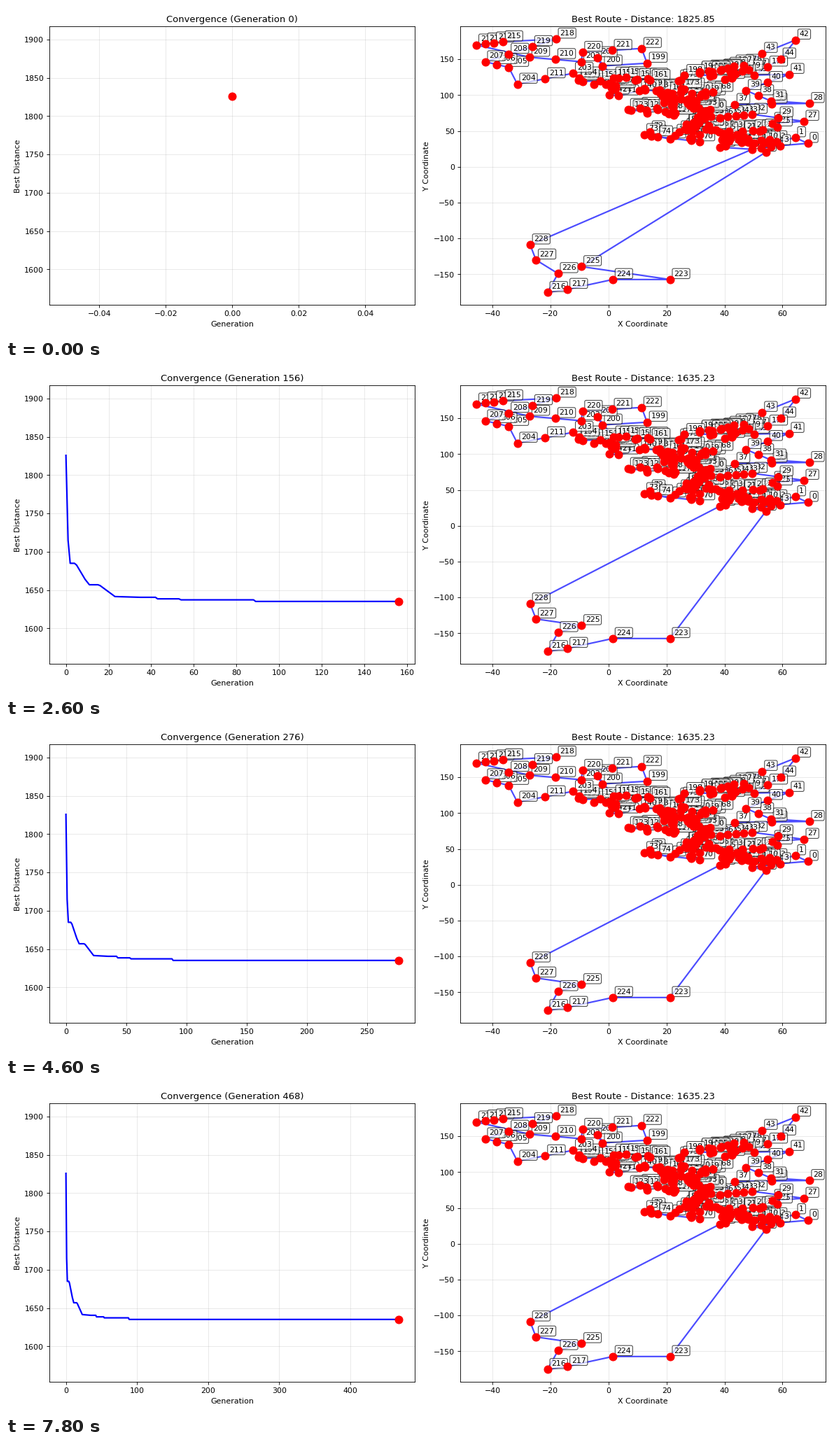
Animation, 1183 px wide and 473 px high, one loop 8000 ms. Source, as a matplotlib script:

```python
import numpy as np
import matplotlib.pyplot as plt
from matplotlib.animation import FuncAnimation

DPI = 78.87
FRAMES, INTERVAL, GEN_STEP = 40, 200, 12
TOP, BOTTOM = 1 - 29.4 / 473, 1 - 427.4 / 473
rng = np.random.default_rng(7)
cities = {}


def run(first, last):
    """Consecutive labels, counting up or down, both ends included."""
    step = 1 if last > first else -1
    return list(range(first, last + step, step))


def walk(labels, corners, scatter=(0, 0)):
    """Lay labels between fixed corners; the ones between are scattered."""
    at = [labels.index(c) for c in corners]
    pts = np.array(list(corners.values()))
    for i, label in enumerate(labels):
        pos = np.array([np.interp(i, at, pts[:, k]) for k in (0, 1)])
        if label not in corners:
            pos += rng.uniform(-1, 1, 2) * scatter
        cities[label] = pos
    return labels


# South-east corner and the eastern rim
route = walk([4, 7, 5, 6, 3, 0, 1],
             {4: (54.3, 20.5), 7: (49.5, 24.4), 3: (59.2, 29.5), 0: (68.7, 32.7), 1: (64.4, 40.6)})
route += walk([2] + run(8, 25),
              {2: (58, 35), 14: (46, 34), 21: (46.2, 48.4), 25: (58.2, 55.7)}, (2, 4))
route += walk([26, 27, 29] + run(32, 37) + [30, 28, 31] + run(38, 41) + [45, 176, 44, 42, 43, 178],
              {26: (56.5, 60.6), 27: (67.3, 63.5), 32: (49.5, 73.3), 36: (38.4, 68.4),
               37: (43.5, 87), 28: (69.2, 88.4), 31: (56, 91.9), 39: (47.4, 106.5),
               41: (62.2, 129), 45: (50.2, 128), 44: (59.4, 150.5), 42: (64.5, 176.9),
               43: (53, 158.3), 178: (46.6, 141.7)})

# Northern cluster and the band leading west
route += walk([177] + run(179, 198),
              {177: (48.3, 135.8), 183: (40, 122), 187: (43.2, 140.7), 193: (31.4, 131),
               197: (36, 128), 198: (26.2, 127.5)}, (1.5, 3))
route += walk(run(175, 155),
              {175: (25, 121), 171: (25, 103), 168: (36, 104), 163: (29.7, 91),
               161: (14.3, 120.7), 155: (1.7, 124)}, (1.5, 4))

# Western loop
route += walk([201, 200, 199, 222, 221, 220, 202, 210, 209] + run(212, 215)
              + [218, 219, 208, 207, 206, 205, 204, 211, 203],
              {201: (-3.9, 152.4), 200: (-2.2, 140.7), 199: (13.3, 144.6), 222: (11.4, 165.2),
               220: (-9, 159.8), 202: (-9.3, 146.6), 209: (-27.2, 152.9), 212: (-45.5, 170),
               215: (-36.4, 174.5), 218: (-18.1, 178.3), 207: (-42.5, 146.6),
               205: (-34.4, 138.8), 204: (-31.4, 115.3), 203: (-12.2, 130.5)})
route += walk(run(154, 141), {154: (-10, 124), 148: (-1, 115), 141: (3.5, 99)}, (3, 6))

# Dense core
route += walk(run(140, 78),
              {140: (10.6, 106), 133: (22, 102), 126: (19, 90), 124: (13, 78.5), 122: (6.8, 80),
               116: (23, 75), 108: (25, 95), 98: (34, 75), 78: (27, 52)}, (2.5, 4))
route += walk(run(77, 71),
              {77: (24.3, 48.9), 75: (21.4, 39), 73: (12.4, 45), 72: (14.3, 48.9), 71: (14.7, 43)})
route += walk(run(70, 46),
              {70: (31.4, 35), 63: (28, 56), 56: (37, 52), 52: (41.5, 44), 46: (38.4, 27.4)}, (2.5, 5))

# Southern loop, in its first and improved order
south = walk([228, 227, 226, 216, 217, 224, 223, 225],
             {228: (-27, -109), 227: (-25, -130), 226: (-17.4, -149), 216: (-21, -175.4),
              217: (-14.1, -171), 224: (1.5, -157.3), 223: (21.2, -157.3), 225: (-9.3, -139.3)})
first_route = [c for c in route if c != 7] + [7] + south
best_route = route + south[:2] + south[-1:] + south[2:-1]


def path(labels):
    return np.array([cities[c] for c in labels + labels[:1]])


first_path, best_path = path(first_route), path(best_route)

# Best distance: a steep fall, then three late single-step gains
gens = np.arange(FRAMES * GEN_STEP)
best = np.interp(gens, [0, 1, 2, 4.5, 9, 11, 15.5, 23, 34],
                 [1825.85, 1715, 1685, 1685, 1664, 1657, 1657, 1641.6, 1640.61])
for gen, gain in ((43, 2), (54, 1.3), (89, 2.08)):
    best[gen:] -= gain

fig, (ax1, ax2) = plt.subplots(1, 2, figsize=(15, 6), dpi=DPI)
for ax, xlabel, ylabel in ((ax1, "Generation", "Best Distance"),
                           (ax2, "X Coordinate", "Y Coordinate")):
    ax.set_xlabel(xlabel)
    ax.set_ylabel(ylabel)
    ax.grid(True, alpha=0.3)

curve, = ax1.plot([], [], "b-", lw=2)
head, = ax1.plot([], [], "ro", markersize=10)
ax1.set_ylim(best.min() * 0.95, best.max() * 1.05)

tour, = ax2.plot([], [], "b-", lw=2, alpha=0.7)
xy = np.array([cities[c] for c in sorted(cities)])
ax2.scatter(xy[:, 0], xy[:, 1], c="red", s=100, zorder=5)
ax2.set_xlim(-51.2, 74.9)
ax2.set_ylim(-193, 195.9)
box = dict(boxstyle="round,pad=0.2", facecolor="white", alpha=0.7)
for label, pos in enumerate(xy):
    note = ax2.annotate(str(label), pos, xytext=(5, 5), textcoords="offset points",
                        fontsize=10, bbox=box)
    note.set_in_layout(False)


def update(i):
    gen = i * GEN_STEP
    curve.set_data(gens[:gen + 1], best[:gen + 1])
    head.set_data([gen], [best[gen]])
    margin = gen * 0.05 if gen else 0.055
    ax1.set_xlim(-margin, gen + margin)
    ax1.set_title(f"Convergence (Generation {gen})")
    pts = best_path if gen else first_path
    tour.set_data(pts[:, 0], pts[:, 1])
    ax2.set_title(f"Best Route - Distance: {best[gen]:.2f}")
    fig.tight_layout()
    fig.subplots_adjust(top=TOP, bottom=BOTTOM)
    return curve, head, tour


anim = FuncAnimation(fig, update, frames=FRAMES, interval=INTERVAL, repeat=True)
plt.show()
```
